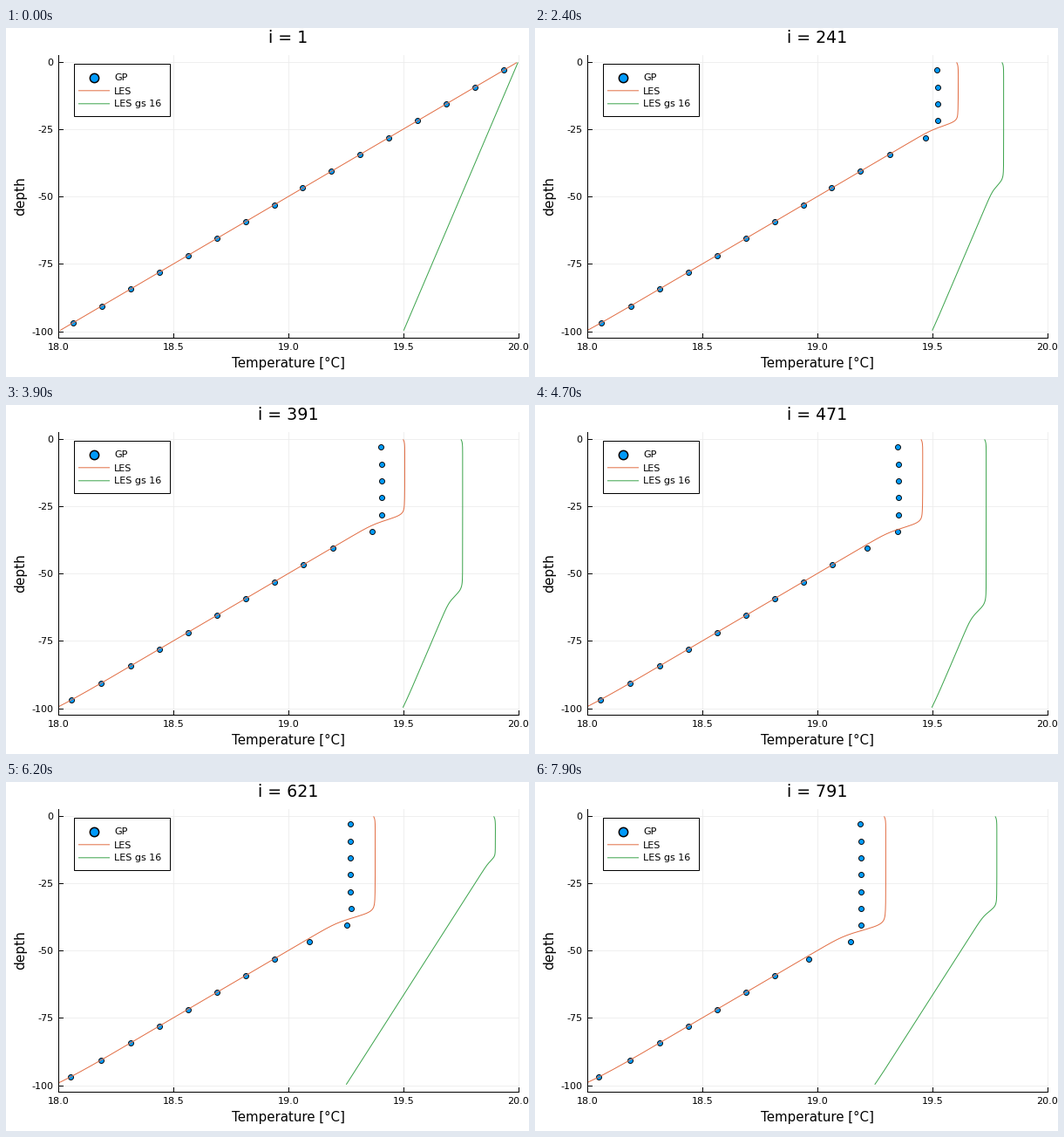
A matplotlib script that plays this animation: 600x400 px, repeating every 8000 ms.

```python
import numpy as np
import matplotlib.pyplot as plt
from matplotlib.animation import FuncAnimation
from matplotlib.patches import Rectangle

plt.rcParams["font.family"] = "DejaVu Sans"
BLUE, ORANGE, GREEN = "#009AFA", "#E26F46", "#3DA44D"
PX = 0.72  # one pixel in points at 100 dpi
LEFT, RIGHT, TOP, BOTTOM = 60.3, 587.7, 30.5, 354.5
FRAMES, STEP = 80, 10
RESTART = 576  # step at which the second green run begins

fig = plt.figure(figsize=(6, 4), dpi=100, facecolor="white")
ax = fig.add_axes([0, 0, 1, 1])
ax.set(xlim=(0, 600), ylim=(400, 0))
ax.axis("off")


def px(temp):
    return LEFT + (RIGHT - LEFT) * (temp - 18) / 2


def py(z):
    return 38.6 - 3.09 * z


def line(xs, ys, color="black", width=1.0, **kw):
    return ax.plot(xs, ys, color=color, lw=width * PX, **kw)[0]


def label(x, y, text, size=8, **kw):
    kw = {"ha": "center", "va": "baseline", **kw}
    return ax.text(x, y, text, fontsize=size, **kw)


def sigmoid(x):
    return 1 / (1 + np.exp(-np.clip(x, -60, 60)))


def bottom_drift(z, s):
    return 0.028 * s / 790 * np.exp(-(z + 100) / 4)


def les(z, s, grad, rate):
    """Mixed layer deepening into a linear profile after s steps."""
    lin = 20 + grad * z
    if s == 0:
        return lin
    drop = rate * np.sqrt(s) * (1 - np.exp(-(s / 6) ** 2))
    depth = 1.19 * drop / grad
    above = z + depth
    mixed = 20 - drop - 0.01 * np.exp(z / 0.9)
    mixed -= 0.02 * drop * np.exp(-np.maximum(above, 0) / 3)
    temp = lin + (mixed - lin) * sigmoid(above / (0.6 + 0.012 * depth))
    return temp - bottom_drift(z, s) * grad / 0.02


def gp(z, s):
    lin = 20 + 0.02 * z
    if s == 0:
        return lin
    drop = 0.025 * np.sqrt(s) + 0.108 * (1 - np.exp(-s / 140))
    h = drop / 0.02
    mix = sigmoid((0.11 + 0.002 * h - (-z - h) / h) / 0.055)
    mixed = 20 - drop - 0.003 * (z > -4)
    return lin + (mixed - lin) * mix - bottom_drift(z, s)


# Grid, axes and ticks
for t in np.linspace(18, 20, 5):
    x = px(t)
    line([x, x], [TOP, BOTTOM], "#ececec", 0.8, zorder=1)
    line([x, x], [BOTTOM, BOTTOM - 5], zorder=5)
    label(x, 369, f"{t:.1f}")
for z in np.linspace(0, -100, 5):
    y = py(z)
    line([LEFT, RIGHT], [y, y], "#ececec", 0.8, zorder=1)
    line([LEFT, LEFT + 5], [y, y], zorder=5)
    label(54.5, y + 4, f"{z:.0f}", ha="right")
line([LEFT, LEFT, RIGHT], [TOP, BOTTOM, BOTTOM], zorder=5)

label(324, 389, "Temperature [°C]", 10.8)
label(16.5, 193, "depth", 11.1, rotation=90, va="center",
      rotation_mode="default")
title = label(324, 17, "", 13.7)

# Curves
z_les = np.linspace(-0.4, -99.6, 256)
z_gp = -3.125 - 6.25 * np.arange(16)
plot_box = Rectangle((LEFT, TOP), RIGHT - LEFT, BOTTOM - TOP,
                     transform=ax.transData)
dots = ax.plot([], [], "o", ms=6 * PX, mfc=BLUE, mec="black", mew=0.9 * PX,
               zorder=2, snap=False)[0]
coarse = line([], [], ORANGE, zorder=3)
fine = line([], [], GREEN, zorder=3)
for curve in (coarse, fine):
    curve.set_clip_path(plot_box)

# Legend
ax.add_patch(Rectangle((77.5, 40.5), 110, 60.5, fc="white", ec="black",
                       lw=PX, zorder=6))
ax.plot([101], [56.6], "o", ms=10.3 * PX, mfc=BLUE, mec="black",
        mew=1.5 * PX, zorder=7, snap=False)
for y, color in ((71.8, ORANGE), (86.8, GREEN)):
    line([83.5, 118.5], [y, y], color, zorder=7, snap=False)
for y, name in ((60.5, "GP"), (75.5, "LES"), (90.5, "LES gs 16")):
    label(124, y, name, ha="left", zorder=7)


def update(n):
    s = n * STEP
    title.set_text(f"i = {s + 1}")
    dots.set_data(px(gp(z_gp, s)), py(z_gp))
    coarse.set_data(px(les(z_les, s, 0.02, 0.025)), py(z_les))
    if s < RESTART:
        green = les(z_les, s, 0.005, 0.01226)
    else:
        green = les(z_les, s - RESTART, 0.0075, 0.015)
    fine.set_data(px(green), py(z_les))
    return title, dots, coarse, fine


anim = FuncAnimation(fig, update, frames=FRAMES, interval=100, repeat=True,
                     repeat_delay=0)
plt.show()
```
